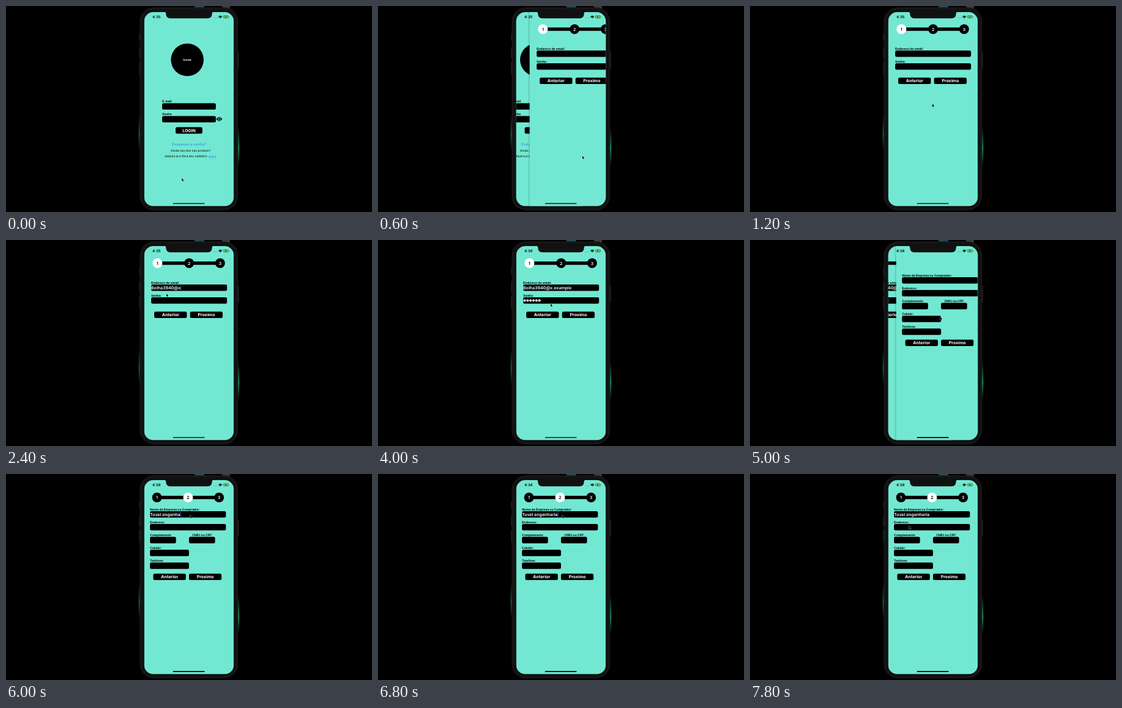
Recreate the animation shown at these times as an HTML page with a canvas. Size 600 by 338 pixels, loop 8 s.

```html
<!DOCTYPE html>
<html lang="pt">
<head>
<meta charset="utf-8">
<style>
  html, body { margin: 0; width: 100%; height: 100%; overflow: hidden; background: #000; }
  canvas { display: block; width: 600px; height: 338px; }
</style>
</head>
<body>
<canvas id="stage"></canvas>
<script>
const W = 600, H = 338, LOOP = 8000;
const MINT = '#72e8d2', BLACK = '#000', WHITE = '#fff', LINK = '#2488ee';
const SCREEN = { x: 226.5, y: 10, w: 147, h: 318.5, r: 15 };
const EMAIL = 'Bolha3940@x.example', COMPANY = 'Tuvel engenharia';
const canvas = document.getElementById('stage');
const ctx = canvas.getContext('2d');
const dpr = window.devicePixelRatio || 1;
canvas.width = W * dpr;
canvas.height = H * dpr;

function box(x, y, w, h, r, fill) {
  ctx.beginPath();
  ctx.roundRect(x, y, w, h, r);
  ctx.fillStyle = fill;
  ctx.fill();
}

function disc(x, y, r, fill) {
  ctx.beginPath();
  ctx.arc(x, y, r, 0, Math.PI * 2);
  ctx.fillStyle = fill;
  ctx.fill();
}

// y is the middle of the capital letters
function text(str, x, y, size, { weight = 700, color = BLACK, align = 'left' } = {}) {
  ctx.font = `${weight} ${size}px Inter, sans-serif`;
  ctx.textAlign = align;
  ctx.fillStyle = color;
  ctx.fillText(str, x, y + size * 0.36);
  return ctx.measureText(str).width;
}

function button(label, x, y, w) {
  box(x, y, w, 10.6, 2.5, BLACK);
  text(label, x + w / 2, y + 5.3, 7, { color: WHITE, align: 'center' });
}

function field(label, x, y, w, labelX = x) {
  text(label, labelX, y - 3.3, 5);
  box(x, y, w, 10.6, 2.5, BLACK);
}

function typed(str, x, y, showCaret) {
  const width = text(str, x, y, 7, { weight: 600, color: WHITE });
  if (showCaret) box(x + width + 0.3, y - 4, 0.8, 8, 0, '#3f74f4');
}

const typedPart = (str, t, start, end) =>
  str.slice(0, Math.max(0, Math.floor((t - start) / (end - start) * str.length + 1e-6)));

function stepper(centers, y, active) {
  box(centers[0], y - 2.8, centers[2] - centers[0], 5.6, 0, BLACK);
  centers.forEach((x, i) => {
    disc(x, y, 8, i === active ? WHITE : BLACK);
    text(i + 1, x, y, 7, { weight: 600, color: i === active ? BLACK : WHITE, align: 'center' });
  });
}

function eye(x, y) {
  ctx.beginPath();
  ctx.moveTo(x - 5, y);
  ctx.quadraticCurveTo(x, y - 7, x + 5, y);
  ctx.quadraticCurveTo(x, y + 7, x - 5, y);
  ctx.fillStyle = BLACK;
  ctx.fill();
  disc(x, y, 2.3, MINT);
  disc(x, y, 1.4, BLACK);
}

function loginPage() {
  disc(297.2, 88.2, 26.8, BLACK);
  text('Icone', 297, 88.3, 5, { color: WHITE, align: 'center' });
  field('E-mail', 256, 159.5, 88);
  field('Senha', 256, 180.5, 88);
  eye(349.5, 185.6);
  button('LOGIN', 278, 198.8, 44);
  const small = { weight: 400 }, link = { weight: 400, color: LINK };
  text('Esqueceu a senha?', 300, 226.8, 6.1, { ...link, align: 'center' });
  text('Ainda nao tem seu produto?', 302.7, 236.8, 4.9, { ...small, align: 'center' });
  text('adquira ja e faca seu cadastro', 260, 246.7, 4.9, small);
  text('aqui', 332, 246.7, 6.1, link);
}

function accountPage(t) {
  stepper([248.3, 300.2, 351], 38, 0);
  field('Endereco de email:', 238, 73, 124.3);
  field('Senha:', 238, 94, 124.3);
  typed(typedPart(EMAIL, t, 1750, 2873), 238, 78.2, t > 1600 && t < 3100);
  const dots = typedPart('******', t, 3300, 3750).length;
  for (let i = 0; i < dots; i++) disc(240.4 + i * 4.85, 99.3, 1.95, WHITE);
  if (t > 3150 && t < 3900) box(238.4 + dots * 4.85, 95.3, 0.8, 8, 0, '#3f74f4');
  button('Anterior', 243, 117.5, 53.5);
  button('Proximo', 301.7, 117.5, 53.5);
}

function companyPage(t) {
  if (t >= 5200) stepper([247.5, 298.5, 349.3], 38.5, 1);
  field('Nome da Empresa ou Comprador:', 236, 61, 124.5);
  field('Endereco:', 236, 82, 124.5);
  field('Complemento:', 236, 103.1, 42.7);
  field('CNPJ ou CPF:', 300, 103.1, 42.7, 305.2);
  field('Celular:', 236, 124.2, 64);
  field('Telefone:', 236, 145.2, 64);
  typed(typedPart(COMPANY, t, 5350, 6150), 236, 66.2, t > 5300 && t < 7400);
  button('Anterior', 241.4, 163.5, 53.5);
  button('Proximo', 300, 163.5, 53.3);
}

function shifted(dx, page, t) {
  ctx.save();
  ctx.translate(dx, 0);
  ctx.fillStyle = MINT;
  ctx.fillRect(SCREEN.x, SCREEN.y, SCREEN.w, SCREEN.h);
  page(t);
  ctx.restore();
}

// The incoming page glides over the old one, which drifts left by 30 %
function push(from, to, t, start) {
  const rest = Math.exp(-(t - start) * 0.012);
  const dx = SCREEN.w * rest;
  if (dx < 0.3) return shifted(0, to, t);
  shifted(-0.3 * SCREEN.w * (1 - rest), from, t);
  const edge = SCREEN.x + dx;
  const shade = ctx.createLinearGradient(edge - 3, 0, edge, 0);
  shade.addColorStop(0, 'rgba(0,0,0,0)');
  shade.addColorStop(1, 'rgba(0,0,0,0.2)');
  ctx.fillStyle = shade;
  ctx.fillRect(edge - 3, SCREEN.y, 3, SCREEN.h);
  shifted(dx, to, t);
}

function glow(x, y, w, h, color) {
  const g = ctx.createLinearGradient(0, y, 0, y + h);
  g.addColorStop(0, BLACK);
  g.addColorStop(0.55, color);
  g.addColorStop(1, BLACK);
  ctx.fillStyle = g;
  ctx.fillRect(x, y, w, h);
}

function phoneBody() {
  box(309, 0, 16, 3, 0, '#24485a');
  box(354, 0, 13, 4, 0, '#3a3a3a');
  glow(217.6, 178, 2.2, 60, '#17694c');
  glow(380, 200, 2.4, 62, '#1d9a64');
  box(381, 144.5, 1.5, 1, 0, '#333');
  for (const [y, h] of [[45, 12], [68, 18], [92, 21]]) box(218, y, 2, h, 0.8, '#202020');
  box(380, 75, 2, 28, 0.8, '#202020');
  box(219.3, 2.3, 161.2, 333, 23, '#171717');
  box(222, 5, 155.8, 327.8, 20, '#111');
}

function statusBar(t) {
  ctx.beginPath();
  ctx.moveTo(259, 9);
  ctx.quadraticCurveTo(262.3, 10, 262.3, 13);
  ctx.quadraticCurveTo(262.3, 20.3, 269.5, 20.3);
  ctx.lineTo(330.5, 20.3);
  ctx.quadraticCurveTo(337.7, 20.3, 337.7, 13);
  ctx.quadraticCurveTo(337.7, 10, 341, 9);
  ctx.fillStyle = '#111';
  ctx.fill();
  text(t < 3200 ? '4:35' : '4:36', 246.7, 17.9, 6, { weight: 600, align: 'center' });
  for (let i = 0; i < 4; i++) disc(340.5 + i * 1.9, 19.5, 0.5, '#3f9384');
  ctx.beginPath();
  ctx.moveTo(351.3, 20.4);
  ctx.arc(351.3, 20.4, 4.6, -Math.PI * 0.76, -Math.PI * 0.24);
  ctx.fillStyle = '#153c37';
  ctx.fill();
  box(356.3, 15.6, 8.2, 4.7, 1.3, '#2e6d51');
  box(357, 16.3, 6.8, 3.3, 0.7, '#5fce5e');
  box(364.8, 17.1, 0.7, 1.7, 0.3, '#2e6d51');
  box(359.8, 16.8, 1.2, 2.3, 0, '#16361f');
}

const POINTER = [
  [0, 288.3, 282.5], [150, 288.3, 282.5], [430, 335, 246], [900, 335, 246],
  [1500, 263, 76], [1900, 263, 88], [2900, 263, 88], [3150, 265, 97],
  [3600, 266, 98], [4000, 283, 104.5], [4600, 314, 121], [5000, 312, 126],
  [5300, 302, 67.5], [7300, 302, 67.5], [7650, 261, 85.5], [LOOP, 261, 85.5]
];

function pointer(t) {
  const i = POINTER.findIndex(p => p[0] > t);
  const [t0, x0, y0] = POINTER[i - 1], [t1, x1, y1] = POINTER[i];
  const p = (t - t0) / (t1 - t0), k = p * p * (3 - 2 * p);
  ctx.save();
  ctx.translate(x0 + (x1 - x0) * k, y0 + (y1 - y0) * k);
  ctx.beginPath();
  for (const [x, y] of [[0, 0], [0, 4.6], [1, 3.8], [1.8, 5.5], [2.6, 5.1], [1.9, 3.5], [3.2, 3.4]]) ctx.lineTo(x, y);
  ctx.closePath();
  ctx.strokeStyle = '#d8e4e1';
  ctx.lineWidth = 0.7;
  ctx.stroke();
  ctx.fillStyle = BLACK;
  ctx.fill();
  ctx.restore();
}

function draw(t) {
  ctx.setTransform(dpr, 0, 0, dpr, 0, 0);
  ctx.textRendering = 'geometricPrecision';
  ctx.fillStyle = BLACK;
  ctx.fillRect(0, 0, W, H);
  phoneBody();
  ctx.save();
  ctx.beginPath();
  ctx.roundRect(SCREEN.x, SCREEN.y, SCREEN.w, SCREEN.h, SCREEN.r);
  ctx.clip();
  if (t < 443) shifted(0, loginPage, t);
  else if (t < 4800) push(loginPage, accountPage, t, 443);
  else push(accountPage, companyPage, t, 4800);
  statusBar(t);
  box(273.7, 323.3, 52, 1.8, 0.9, t < 4800 ? '#173c36' : BLACK);
  ctx.restore();
  pointer(t);
}

function tick() {
  draw(performance.now() % LOOP);
  requestAnimationFrame(tick);
}
tick();
</script>
</body>
</html>
```
